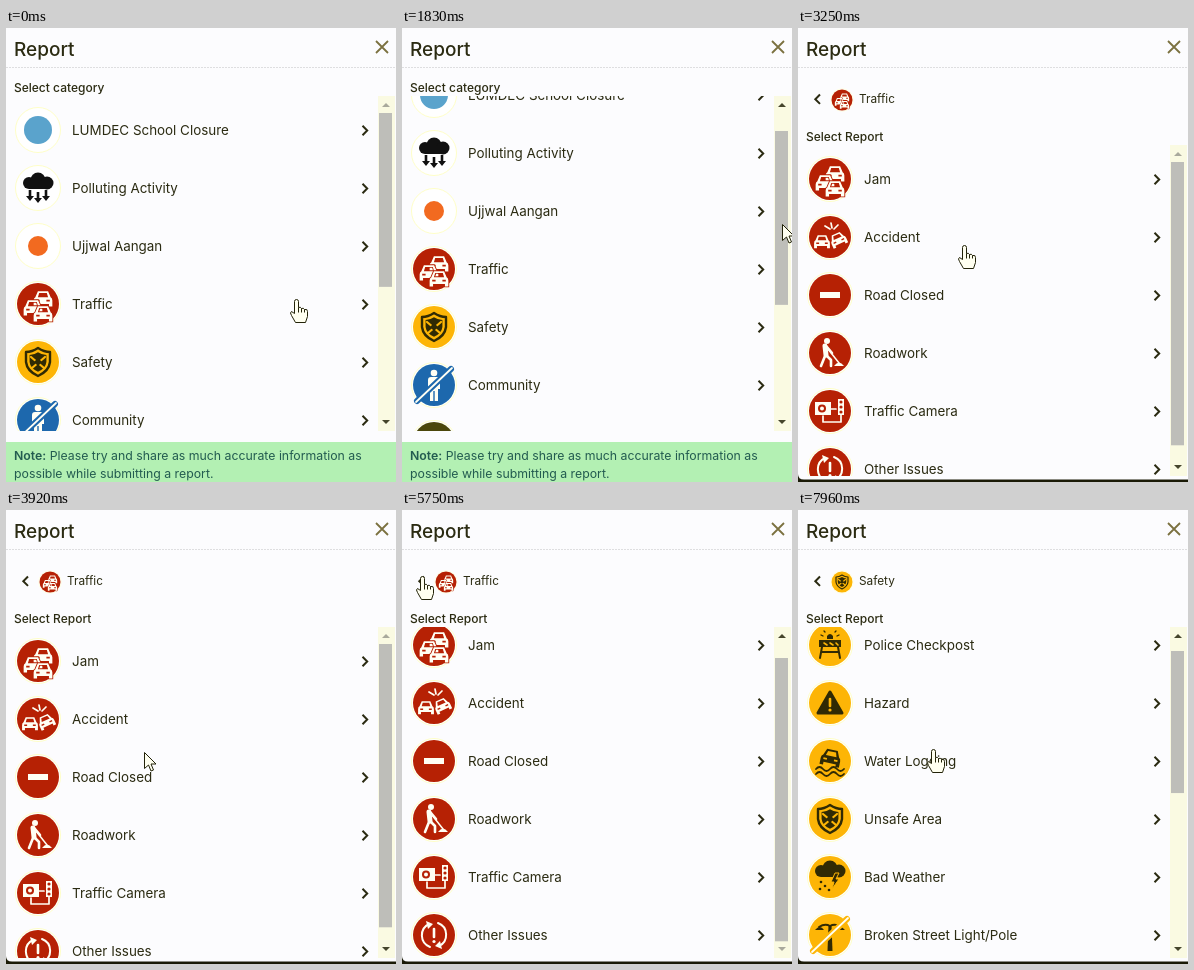
Recreate the animation shown at these times as an HTML page. Size 390 by 454 pixels, loop 8000 ms.

```html
<!DOCTYPE html>
<html lang="en">
<head>
<meta charset="utf-8">
<title>Report</title>
<style>
  html, body { margin: 0; width: 100%; height: 100%; overflow: hidden; background: #1a1a06; }
  svg { display: block; width: 390px; height: 454px; font-family: Inter, "Open Sans", sans-serif; fill: #2b2b12; }
  .title { font-size: 19px; font-weight: 500; }
  .label { font-size: 12px; font-weight: 500; }
  .row { font-size: 13.4px; }
  .crumb { font-size: 11.8px; }
  .note { font-size: 12.3px; fill: #235c50; }
  .line { fill: none; stroke: #2b2b12; stroke-width: 2; }
</style>
</head>
<body>
<svg id="stage" viewBox="0 0 390 454"></svg>
<script>
const LOOP = 8000, ROW = 58;
const RED = '#b62104', AMBER = '#fdb506', INK = '#302a04', WHITE = '#fffff4';

// Icon parts are centred on 0,0; currentColor is the disc colour.
const at = (x, y, body, more = '') => `<g transform="translate(${x} ${y}) ${more}">${body}</g>`;
const dot = (x, y, r, fill = '') => `<circle cx="${x}" cy="${y}" r="${r}" ${fill && `fill="${fill}"`}/>`;
const shape = (d, more = '') => `<path d="${d}" ${more}/>`;
const stroke = (d, color, width = 2) =>
  shape(d, `fill="none" stroke="${color}" stroke-width="${width}" stroke-linecap="round" stroke-linejoin="round"`);

const car = (x, y, scale, turn = 0) => at(x, y, shape(
  'M-9-1L-6-8H6L9-1Q11 0 11 3V10H7V7H-7V10H-11V3Q-11 0-9-1ZM-6-1H6L4.5-6H-4.5ZM-8 2V4H-4V2ZM4 2V4H8V2Z',
  'fill-rule="evenodd" stroke="currentColor" stroke-width="2" paint-order="stroke"'), `rotate(${turn}) scale(${scale})`);
const cars = car(5, -6, .85) + car(-5, 3, .85) + car(5, 9, .85);
const cloud = dot(-9, -5, 6) + dot(0, -8, 7.5) + dot(9, -5, 6.5) + shape('M-9-7H9V1H-9Z');
const downArrow = (x, y) => at(x, y, shape('M-1.3 0H1.3V6H4L0 11-4 6H-1.3Z'));
const shieldPath = 'M0-14Q6-10 12-10V0Q11 9 0 14Q-11 9-12 0V-10Q-6-10 0-14Z';
const shield = stroke(shieldPath, INK, 2.4) + shape(shieldPath, 'transform="scale(.7)"') +
  stroke('M-7-5L6 6M7-5L-6 6', 'currentColor', 2.2) + shape('M0-4L4 0 0 4-4 0Z');
const slash = stroke('M-17 16L17-16', 'currentColor', 6) + stroke('M-18 17L18-17', WHITE, 1.8);
const wave = y => stroke(`M-14 ${y}q3.5-4 7 0t7 0t7 0t7 0`, INK, 1.8);

const icons = {
  globe: ['#fff', '#5aa3cc', dot(0, 0, 14)],
  drive: ['#fff', '#f26a20', dot(0, 0, 10)],
  pollution: ['#fff', '#111', cloud + downArrow(-8, 2) + downArrow(0, 4) + downArrow(8, 2)],
  traffic: [RED, WHITE, cars],
  safety: [AMBER, INK, shield],
  community: ['#1d68ad', WHITE, dot(0, -12, 3.3) +
    shape('M-3-8H3Q6-8 6-5V4H4V16H.7V6H-.7V16H-4V4H-6V-5Q-6-8-3-8Z') + slash],
  road: ['#4b470b', WHITE, car(-2, -4, .9) + stroke('M9-8l4 5', WHITE) + stroke('M-13 10H13', WHITE)],
  accident: [RED, WHITE, car(-8, 4, .72) + car(8, 2, .72, -24) + stroke('M0-8L-5-11M2-9L1-14M4-8L8-12', WHITE, 1.7)],
  closed: [RED, WHITE, shape('M-10-3H10V3H-10Z')],
  roadwork: [RED, WHITE, dot(-3, -12, 3) + stroke('M-5-7L-4 2', WHITE, 5) +
    stroke('M-5 3L-9 13M-3 3L1 7V13M-3-6L2 0', WHITE, 2.6) + stroke('M-2-4L9 10', WHITE, 1.5) + shape('M4 13Q9 6 14 13Z')],
  camera: [RED, WHITE, shape('M-15-9H1V4H-15Z') + dot(-8, -2.5, 4, 'currentColor') + dot(-8, -2.5, 2) +
    stroke('M-7 5V11H11V3M1-2H6', WHITE, 1.7) + shape('M8-12H14V4H8Z') +
    [-9, -4, 1].map(y => dot(11, y, 1.6, 'currentColor')).join('')],
  other: [RED, WHITE, stroke('M-4 12A12.5 12.5 0 0 1-5-11M4-12A12.5 12.5 0 0 1 5 11', WHITE, 2) +
    shape('M-8-14L-1-11-6-6ZM8 14L1 11 6 6Z') + stroke('M0-6V2', WHITE, 2.6) + dot(0, 6.5, 1.6)],
  police: [AMBER, INK, shape('M-3-6V-9Q0-13 3-9V-6Z') + stroke('M-7-9L-9-10M7-9L9-10M-5-13L-6-14M5-13L6-14', INK, 1.3) +
    shape('M-11-5H11V2H-11Z') + stroke('M-6-2L-3 0M0-2L3 0M6-2L8 0', 'currentColor', 1.6) +
    stroke('M-8 2L-10 13M8 2L10 13M-9 7H9', INK, 2)],
  hazard: [AMBER, INK, stroke('M0-11L12 10H-12Z', INK, 3) + shape('M0-11L12 10H-12Z') +
    stroke('M0-4V3', 'currentColor', 2.6) + dot(0, 7, 1.6, 'currentColor')],
  water: [AMBER, INK, car(1, -4, .9, 12) + wave(8) + wave(13)],
  weather: [AMBER, INK, at(0, -1, cloud) + shape('M5-4L1 5H4L2 12 9 2H6L9-4Z', 'stroke="currentColor"') +
    [[-9, 5], [-5, 9], [-10, 12], [-1, 13]].map(([x, y]) => dot(x, y, 1.3)).join('')],
  light: [AMBER, INK, shape('M-1.5-10H1.5L2.5 16H-2.5Z') + stroke('M-11-8Q-5-12 0-9Q5-12 11-8', INK, 2) +
    shape('M-15-5Q-10-11-6-5ZM6-5Q10-11 15-5Z') + slash],
};

function icon(name, x, y, scale = 1) {
  const [disc, ink, body] = icons[name];
  return at(x, y, `<circle r="22.5" fill="#fff" stroke="#ffffc8"/>` + dot(0, 0, 21, disc) +
    `<g fill="${ink}" color="${disc}">${body}</g>`, `scale(${scale})`);
}

const text = (cls, x, y, words) => `<text class="${cls}" x="${x}" y="${y}">${words}</text>`;

const pages = [
  { top: 68, height: 335, content: 580, label: 'Select category', rows: [
    ['globe', 'LUMDEC School Closure'], ['pollution', 'Polluting Activity'], ['drive', 'Ujjwal Aangan'],
    ['traffic', 'Traffic'], ['safety', 'Safety'], ['community', 'Community'], ['road', 'Road Condition']] },
  { top: 117, height: 331, content: 347, label: 'Select Report', crumb: ['traffic', 'Traffic'], rows: [
    ['traffic', 'Jam'], ['accident', 'Accident'], ['closed', 'Road Closed'],
    ['roadwork', 'Roadwork'], ['camera', 'Traffic Camera'], ['other', 'Other Issues']] },
  { top: 117, height: 331, content: 692, label: 'Select Report', crumb: ['safety', 'Safety'], rows: [
    ['police', 'Police Checkpost'], ['hazard', 'Hazard'], ['water', 'Water Logging'],
    ['safety', 'Unsafe Area'], ['weather', 'Bad Weather'], ['light', 'Broken Street Light/Pole']] },
];

function pageMarkup(page, i) {
  const { top, height, content, crumb } = page;
  const bottom = top + height;
  page.track = height - 34;
  const rows = page.rows.map(([name, words], n) => {
    const y = top + 34 + n * ROW;
    return icon(name, 32, y) + text('row', 66, y + 5, words) + shape(`M356.5 ${y - 4.2}l4.7 4.7-4.7 4.7`, 'class="line"');
  }).join('');
  const heading = crumb
    ? shape('M22 66.5l-4.7 4.7 4.7 4.7', 'class="line"') + icon(crumb[0], 44, 72, .5) + text('crumb', 61, 75, crumb[1])
    : '';
  const note = crumb ? '' : `<rect y="414" width="390" height="40" fill="#b3f0b3"/>` +
    text('note', 8, 432, '<tspan font-weight="600">Note:</tspan> Please try and share as much accurate information as') +
    text('note', 8, 450, 'possible while submitting a report.');
  return `<g id="page${i}">
    <clipPath id="clip${i}"><rect y="${top}" width="372" height="${height}"/></clipPath>
    ${heading}${text('label', 8, top - 4, page.label)}
    <g clip-path="url(#clip${i})"><g class="list">${rows}</g></g>
    <rect x="372" y="${top}" width="17" height="${height}" fill="#fafae2"/>
    <rect class="thumb" x="373" width="13" height="${page.track * height / content}" fill="#bebeb9"/>
    <path class="up" d="M376 ${top + 11}h8l-4-4z"/><path class="down" d="M376 ${bottom - 11}h8l-4 4z"/>
    ${note}</g>`;
}

const cursors = {
  hand: 'M-2 1Q-2-1 0-1Q2-1 2 1V7Q4 6 5 8Q7 7 8 9Q11 8 11 11V16L9 22H-1L-5 15Q-7 12-5 11L-2 13ZM2 7V12M5 8V12M8 9V12',
  arrow: 'M0 0V16L4 12.5 6.5 18.5 9 17.5 6.5 11.5H11.5Z',
  resize: 'M-9 0L-4-5V-2H-1V-9H1V-2H4V-5L9 0 4 5V2H1V9H-1V2H-4V5Z',
};

const stage = document.getElementById('stage');
stage.innerHTML = `<path d="M0 0H390V451.5H6Q0 451.5 0 446Z" fill="#fcfcfe"/>
  ${text('title', 8, 28, 'Report')}
  <path d="M370 13l12 12m0-12l-12 12" fill="none" stroke="#7b7140" stroke-width="1.8"/>
  <path d="M0 39.5H390" stroke="#dedee0" stroke-dasharray="2 1"/>
  ${pages.map(pageMarkup).join('')}
  <path id="cursor" fill="#fffff0" stroke="#222208" stroke-linejoin="round"/>`;

const cursor = document.getElementById('cursor');
pages.forEach((page, i) => {
  page.node = document.getElementById('page' + i);
  for (const part of ['list', 'thumb', 'up', 'down']) page[part] = page.node.querySelector('.' + part);
});

// Pointer tip: time, x, y
const path = [
  [0, 290, 272], [130, 290, 272], [960, 345, 205], [1170, 389, 180], [1330, 389, 180], [1430, 380, 180],
  [2000, 380, 203], [2170, 380, 203], [2330, 302, 207], [2700, 170, 226], [3080, 170, 226], [3250, 166, 218],
  [4300, 122, 255], [4670, 120, 255], [4790, 118, 247], [5450, 20, 67], [5900, 20, 67], [6540, 16, 77],
  [6670, 55, 323], [6800, 95, 330], [7040, 132, 288], [7420, 132, 288], [7900, 135, 240], [LOOP, 135, 240],
];

const ramp = (t, from, to) => Math.min(1, Math.max(0, (t - from) / (to - from)));
const ease = p => p * p * (3 - 2 * p);

function pointer(t) {
  const i = path.findIndex(key => key[0] > t);
  const [t0, x0, y0] = path[i - 1], [t1, x1, y1] = path[i];
  const p = ramp(t, t0, t1);
  return [x0 + (x1 - x0) * p, y0 + (y1 - y0) * p];
}

function pageState(t) {
  if (t < 2850) return [0, 44 * ease(ramp(t, 1430, 2000))];
  if (t < 5850) return [1, 16 * ease(ramp(t, 4000, 4400))];
  if (t < 7450) return [0, 44];
  return [2, 16 * ease(ramp(t, 7700, 7900))];
}

function cursorKind(x, y, page, scroll) {
  if (x >= 387) return 'resize';
  if (page.crumb && x < 100 && y > 60 && y < 84) return 'hand';
  if (x > 368 || y < page.top || y > page.top + page.height) return 'arrow';
  const offset = (y - page.top + scroll) % ROW;
  return Math.abs(offset - 34) <= 22 ? 'hand' : 'arrow';
}

function draw(t) {
  const [index, scroll] = pageState(t), page = pages[index];
  pages.forEach((p, i) => p.node.style.display = i === index ? '' : 'none');
  page.list.setAttribute('transform', `translate(0 ${-Math.round(scroll)})`);
  page.thumb.setAttribute('y', page.top + 17 + Math.round(scroll * page.track / page.content));
  const tint = enabled => enabled ? '#45452c' : '#a9a99c';
  page.up.setAttribute('fill', tint(scroll > 0));
  page.down.setAttribute('fill', tint(scroll < page.content - page.height));

  const [x, y] = pointer(t);
  cursor.setAttribute('d', cursors[cursorKind(x, y, page, scroll)]);
  cursor.setAttribute('transform', `translate(${Math.round(x) + .5} ${Math.round(y) + .5})`);
}

const start = performance.now();
function frame() {
  draw((performance.now() - start) % LOOP);
  requestAnimationFrame(frame);
}
frame();
</script>
</body>
</html>
```
